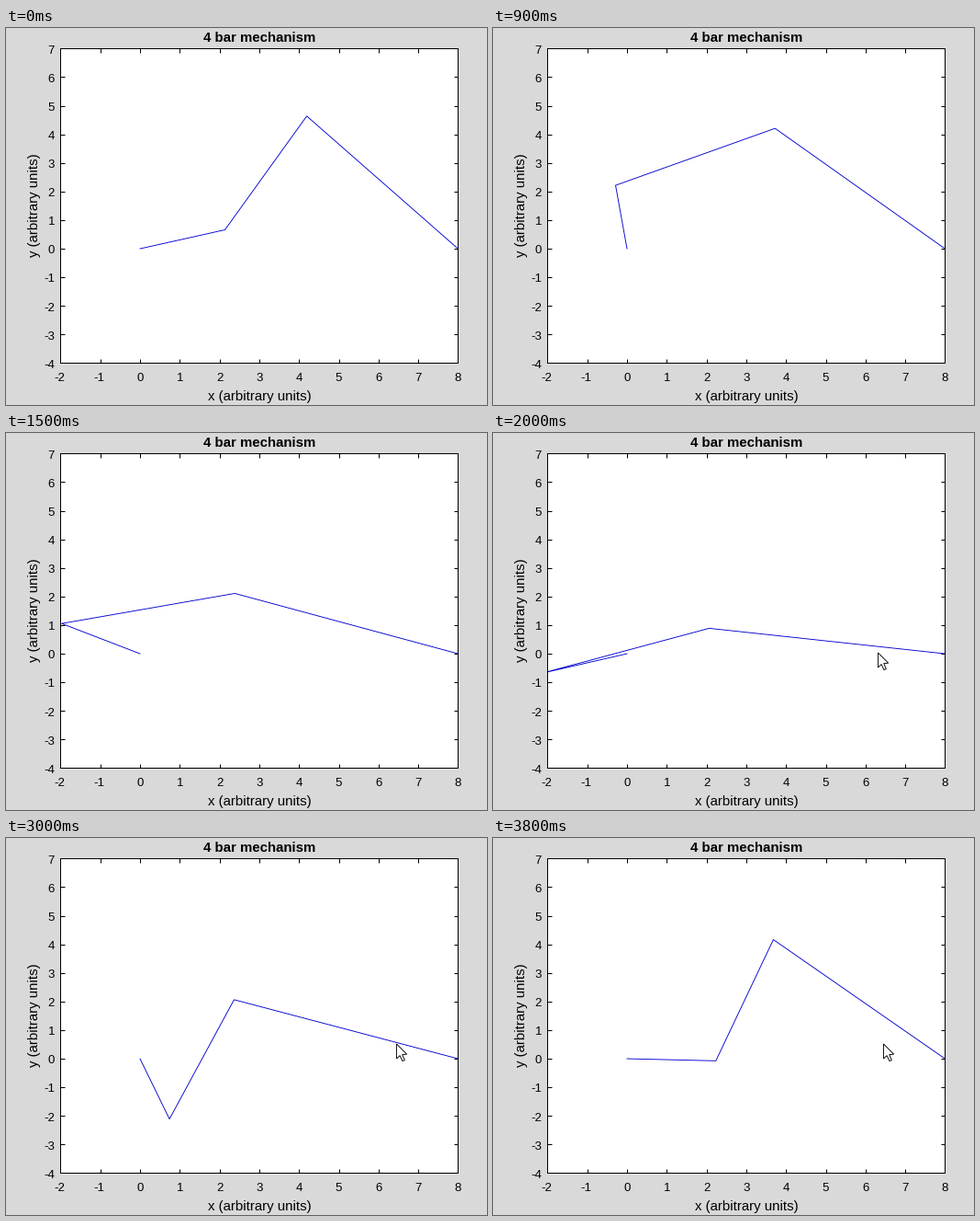
A matplotlib script that plays this animation: 524x410 px, repeating every 4.8 s.

```python
import numpy as np
import matplotlib.pyplot as plt
from matplotlib.animation import FuncAnimation

W, H, DPI = 524, 410, 64
PX = 72 / DPI  # points per pixel
FRAMES, INTERVAL = 48, 100

plt.rcParams["font.family"] = "Liberation Sans"

# Box of the plot in pixels from the top left; just under .5 so it snaps down
LEFT, RIGHT, TOP, BOTTOM = 59.4, 492.4, 22.4, 364.4

CRANK, COUPLER, ROCKER, GROUND = np.sqrt(5), 4.48, 6.0, 8.0
ANGLE_STEP, LAST_STEP = 0.05, 125

ARROW = np.array([(0, 0), (0, 16), (3.6, 12.6), (6.4, 18.6), (8.8, 17.6),
                  (6.2, 11.6), (11.2, 11.2)])

fig = plt.figure(figsize=(W / DPI, H / DPI), dpi=DPI, facecolor="#d9d9d9")
ax = fig.add_axes([LEFT / W, 1 - BOTTOM / H,
                   (RIGHT - LEFT) / W, (BOTTOM - TOP) / H])
ax.set(xlim=(-2, 8), ylim=(-4, 7), xticks=range(-2, 9), yticks=range(-4, 8))
ax.tick_params(direction="in", length=4.5 * PX, width=PX, top=True, right=True,
               labelbottom=False, labelleft=False)
for spine in ax.spines.values():
    spine.set_linewidth(PX)

overlay = fig.add_axes([0, 0, 1, 1])
overlay.set(xlim=(0, W), ylim=(H, 0))
overlay.axis("off")


def label(x, y, text, size, ha="center", **style):
    overlay.text(x, y, text, fontsize=size * PX, ha=ha, va="baseline",
                 rotation_mode="anchor", **style)


label(276, 15, "4 bar mechanism", 15, weight="bold")
label(276, 405, "x (arbitrary units)", 15)
label(35, 193, "y (arbitrary units)", 15, rotation=90)
for x in range(-2, 9):
    px = LEFT + (x + 2) * (RIGHT - LEFT) / 10
    label(px - (1 if x < 0 else 0), 384.5, str(x), 13.3)
for y in range(-4, 8):
    py = BOTTOM - (y + 4) * (BOTTOM - TOP) / 11
    label(53, py + 5.3, str(y), 13.3, ha="right")

links, = ax.plot([], [], color="#0000d0", lw=0.9 * PX, snap=False,
                 solid_joinstyle="round")
cursor = plt.Polygon(ARROW, closed=True, facecolor="white", edgecolor="black",
                     lw=0.9 * PX, joinstyle="miter")
overlay.add_patch(cursor)


def joints(angle):
    """Joints of the linkage as complex numbers, from crank pivot to rocker pivot."""
    crank_end = CRANK * np.exp(1j * angle)
    gap = GROUND - crank_end
    dist = abs(gap)
    cos_lift = (COUPLER**2 + dist**2 - ROCKER**2) / (2 * COUPLER * dist)
    knee = crank_end + COUPLER * gap / dist * np.exp(1j * np.arccos(cos_lift))
    return np.array([0, crank_end, knee, GROUND])


def update(frame):
    step = min(LAST_STEP, int(6.3 + 3.175 * frame))
    points = joints(step * ANGLE_STEP)
    links.set_data(points.real, points.imag)

    # The pointer comes in from the bottom edge and comes to rest
    cursor.set_visible(frame >= 19)
    tip = (np.interp(frame, [19, 20, 21], [398.5, 419.5, 425.5]),
           np.interp(frame, [19, 20, 21], [384, 239, 224]))
    cursor.set_xy(ARROW + tip)
    return links, cursor


anim = FuncAnimation(fig, update, frames=FRAMES, interval=INTERVAL,
                     repeat=True, repeat_delay=0)
plt.show()
```
